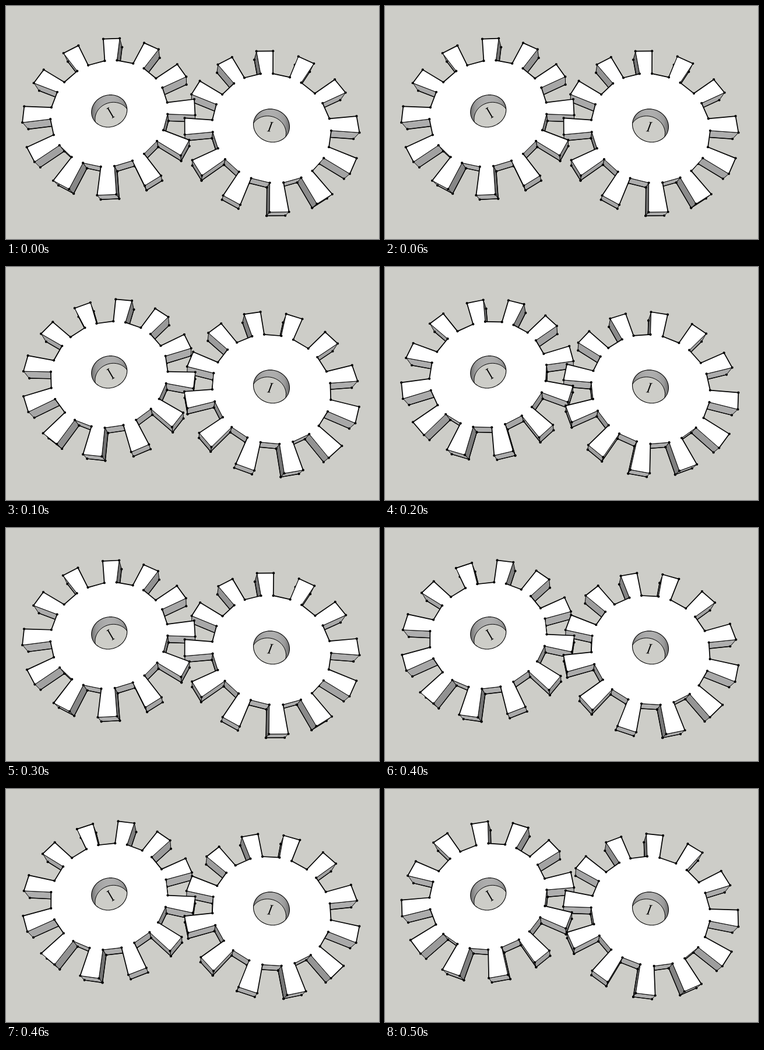
An HTML page with a canvas that plays this animation: 640 by 400 pixels, repeating every 0.6 s.

```html
<!DOCTYPE html>
<html lang="en">
<head>
<meta charset="utf-8">
<title>Meshing gears</title>
<style>
html, body { margin: 0; width: 100%; height: 100%; overflow: hidden; background: #cdcdc8; }
canvas { display: block; }
</style>
</head>
<body>
<canvas id="stage" width="640" height="400"></canvas>
<script>
const ctx = document.getElementById('stage').getContext('2d');
const RAD = Math.PI / 180, GROUND = '#cdcdc8';
const FOCAL = 746, SIN = Math.sin(66.9 * RAD), COS = Math.cos(66.9 * RAD);
const FOOT = [0, -FOCAL * COS]; // ground point right below the camera
const TEETH = 12, TIP = 149.2, ROOT = 101.5, HOLE = 30.8, THICK = 30;
const STEP_MS = 100, TURNS = [0, 8.9, 18.9, 29.6, 40.7, 52.2];
const GEARS = [
  { x: -144.4, y: 22.2, phase: 2.7, dir: -1, mark: [179.5, 183.2], tilt: [0.68, -0.4, 0.6, 1.02] },
  { x: 135.1, y: -5.2, phase: 0.7, dir: 1, mark: [453.5, 207.5], tilt: [0.85, 0.04, -0.36, 0.98] }
];

function project([x, y], z = 0) {
  const k = 1 + (y * COS - z * SIN) / FOCAL;
  return [320 + x / k, 200 - (y * SIN + z * COS) / k];
}

function polar(gear, r, deg) {
  return [gear.x + r * Math.cos(deg * RAD), gear.y + r * Math.sin(deg * RAD)];
}

function outline(gear, turn) {
  const points = [];
  for (let i = 0; i < TEETH; i++) {
    const mid = gear.phase + gear.dir * turn + i * 360 / TEETH;
    points.push(polar(gear, ROOT, mid - 6.3), polar(gear, TIP, mid - 5.9),
                polar(gear, TIP, mid + 5.9), polar(gear, ROOT, mid + 6.3));
  }
  return points;
}

function trace(points) {
  ctx.beginPath();
  points.forEach(p => ctx.lineTo(...p));
  ctx.closePath();
}

function line(a, b, width) {
  ctx.lineWidth = width;
  ctx.beginPath();
  ctx.moveTo(...a);
  ctx.lineTo(...b);
  ctx.stroke();
}

function dot([x, y]) {
  ctx.fillStyle = '#000';
  ctx.beginPath();
  ctx.arc(x, y, 2.1, 0, 7);
  ctx.fill();
}

const gray = facing => {
  const v = Math.round(112 + 62 * Math.max(0, facing));
  return `rgb(${v},${v},${v})`;
};

function edges(points) {
  return points.map((a, i) => {
    const b = points[(i + 1) % points.length];
    const dx = b[0] - a[0], dy = b[1] - a[1];
    const mx = (a[0] + b[0]) / 2 - FOOT[0], my = (a[1] + b[1]) / 2 - FOOT[1];
    return { a, b, facing: dx / Math.hypot(dx, dy),
             seen: dx * my - dy * mx > 0, far: Math.hypot(mx, my) };
  });
}

function drawWall({ a, b, facing }) {
  const low = [project(a, -THICK), project(b, -THICK)];
  trace([project(a), project(b), low[1], low[0]]);
  ctx.fillStyle = gray(facing);
  ctx.fill();
  ctx.lineWidth = 1;
  ctx.stroke();
  line(...low, 1.4);
  low.forEach(dot);
}

function ring(gear, z) {
  return Array.from({ length: 72 }, (_, i) => project(polar(gear, HOLE, i * 5), z));
}

function drawHole(gear) {
  const left = project([gear.x - HOLE, gear.y])[0];
  const right = project([gear.x + HOLE, gear.y])[0];
  const shade = ctx.createLinearGradient(left, 0, right, 0);
  for (let i = 0; i <= 8; i++) {
    const u = i / 4 - 1;
    shade.addColorStop(i / 8, gray(Math.sqrt(1 - u * u)));
  }
  const rim = ring(gear, 0);
  ctx.save();
  trace(rim);
  ctx.clip();
  ctx.fillStyle = shade;
  ctx.fill();
  trace(ring(gear, -THICK));
  ctx.fillStyle = GROUND;
  ctx.fill();
  ctx.lineWidth = 1;
  ctx.stroke();
  ctx.restore();
  trace(rim);
  ctx.lineWidth = 1.1;
  ctx.stroke();

  ctx.save();
  ctx.transform(...gear.tilt, ...gear.mark);
  ctx.fillStyle = '#000';
  ctx.font = '25px "Liberation Serif", serif';
  ctx.textAlign = 'center';
  ctx.fillText('I', 0, 8.2);
  ctx.restore();
}

function drawFace(gear, points, sides) {
  const face = points.map(p => project(p));
  trace(face);
  ctx.fillStyle = '#fff';
  ctx.fill();
  sides.forEach(s => line(project(s.a), project(s.b), s.seen ? 1 : 1.7));
  face.forEach(dot);
  drawHole(gear);
}

function draw(now) {
  const turn = TURNS[Math.floor(now / STEP_MS) % TURNS.length];
  ctx.fillStyle = GROUND;
  ctx.fillRect(0, 0, 640, 400);
  ctx.strokeStyle = '#000';
  ctx.lineJoin = ctx.lineCap = 'round';
  const shapes = GEARS.map(g => outline(g, turn));
  const sides = shapes.map(edges);
  sides.flat().filter(s => s.seen).sort((s, t) => t.far - s.far).forEach(drawWall);
  GEARS.forEach((g, i) => drawFace(g, shapes[i], sides[i]));
}

const start = performance.now();
function tick() {
  draw(performance.now() - start);
  requestAnimationFrame(tick);
}
tick();
</script>
</body>
</html>
```
